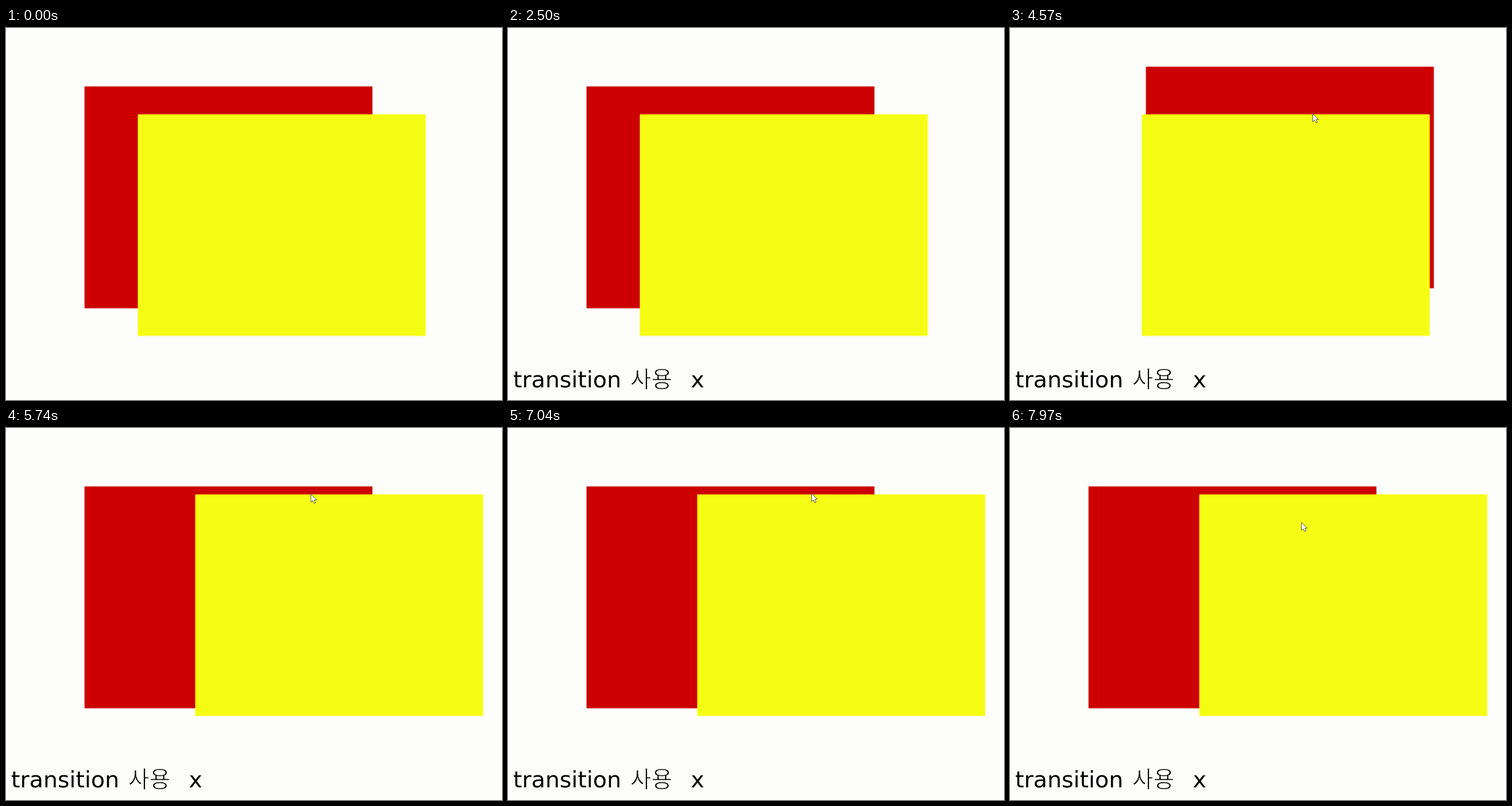
An HTML page with a canvas for the animation above (8000 ms loop, 864 by 648 pixels).

```html
<!DOCTYPE html>
<html lang="ko">
<head>
<meta charset="utf-8">
<title>transition</title>
<style>
  html, body { margin: 0; width: 100%; height: 100%; overflow: hidden; background: #fdfdfc; }
  canvas { display: block; width: 864px; height: 648px; }
</style>
</head>
<body>
<canvas id="stage" width="864" height="648"></canvas>
<script>
const ctx = document.getElementById('stage').getContext('2d');
const LOOP = 8000, STEP = 10, LAG = 30;
const PAPER = '#fdfdfc';

const red = { x: 137.3, y: 102.3, color: '#cc0000' };
const yellow = { x: 230, y: 150.6, color: '#f6fd14' };
const cardSize = { w: 500.6, h: 385.3 };
const lift = { x: 100, y: -34.6 };

// Turning points of the pointer, eased in between
const turns = [
  { t: 3340, x: 818, y: 58 },
  { t: 4200, x: 530, y: 112 },
  { t: 4800, x: 526.5, y: 168 },
  { t: 5130, x: 530, y: 108 },
  { t: 5310, x: 530, y: 108 },
  { t: 5560, x: 531, y: 165 },
  { t: 5840, x: 531.5, y: 96 },
  { t: 6600, x: 510.5, y: 170 },
  { t: 7240, x: 534.5, y: 98 },
  { t: 7770, x: 508, y: 165 }
];

const clamp = v => Math.min(1, Math.max(0, v));
const ease = u => u * u * (3 - 2 * u);
const mix = (a, b, u) => a + (b - a) * u;

function pointerAt(t) {
  if (t < turns[0].t) return null;
  const next = turns.findIndex(p => p.t > t);
  if (next < 0) return turns[turns.length - 1];
  const a = turns[next - 1], b = turns[next];
  const u = ease((t - a.t) / (b.t - a.t));
  return { x: mix(a.x, b.x, u), y: mix(a.y, b.y, u) };
}

function place(card, hovered) {
  return card === hovered ? { x: card.x + lift.x, y: card.y + lift.y } : card;
}

function hits(card, hovered, p) {
  const { x, y } = place(card, hovered);
  return p.x >= x && p.x < x + cardSize.w && p.y >= y && p.y < y + cardSize.h;
}

// A card jumps away under the pointer, so hovering is replayed from the entry on
function hoverAt(t) {
  let hovered = null;
  for (let s = turns[0].t; s <= t; s += STEP) {
    const p = pointerAt(s);
    hovered = [yellow, red].find(card => hits(card, hovered, p)) || null;
  }
  return hovered;
}

function drawCard(card, hovered) {
  const { x, y } = place(card, hovered);
  ctx.fillStyle = ctx.shadowColor = card.color;
  ctx.shadowBlur = 2;
  ctx.fillRect(x, y, cardSize.w, cardSize.h);
  ctx.shadowBlur = 0;
}

function drawCaption(alpha) {
  ctx.globalAlpha = alpha;
  ctx.fillStyle = '#000';
  ctx.font = '39.5px "DejaVu Sans", Verdana, sans-serif';
  ctx.fillText('transition', 9, 626);
  ctx.fillText('x', 318.5, 626);
  // A paper-coloured outline thins the strokes
  ctx.font = '40px "Noto Sans CJK KR", "Noto Sans CJK", sans-serif';
  ctx.strokeStyle = PAPER;
  ctx.lineWidth = 1.1;
  ctx.fillText('사용', 213, 626);
  ctx.strokeText('사용', 213, 626);
  ctx.globalAlpha = 1;
}

const arrow = new Path2D('M0 0V14L3.3 11.2L5.6 16L8 15L5.9 10.3L10 10Z');

function drawPointer({ x, y }) {
  ctx.save();
  ctx.translate(x - 0.3, y - 0.5);
  ctx.fillStyle = '#fff';
  ctx.fill(arrow);
  ctx.lineWidth = 1;
  ctx.strokeStyle = '#4a4a40';
  ctx.stroke(arrow);
  ctx.restore();
}

function draw(t) {
  ctx.fillStyle = PAPER;
  ctx.fillRect(0, 0, 864, 648);
  const hovered = hoverAt(t - LAG);
  drawCard(red, hovered);
  drawCard(yellow, hovered);
  drawCaption(clamp((t - 1840) / 660));
  const p = pointerAt(t);
  if (p) drawPointer(p);
}

const begin = performance.now();
function tick() {
  draw((performance.now() - begin) % LOOP);
  requestAnimationFrame(tick);
}
tick();
</script>
</body>
</html>
```
